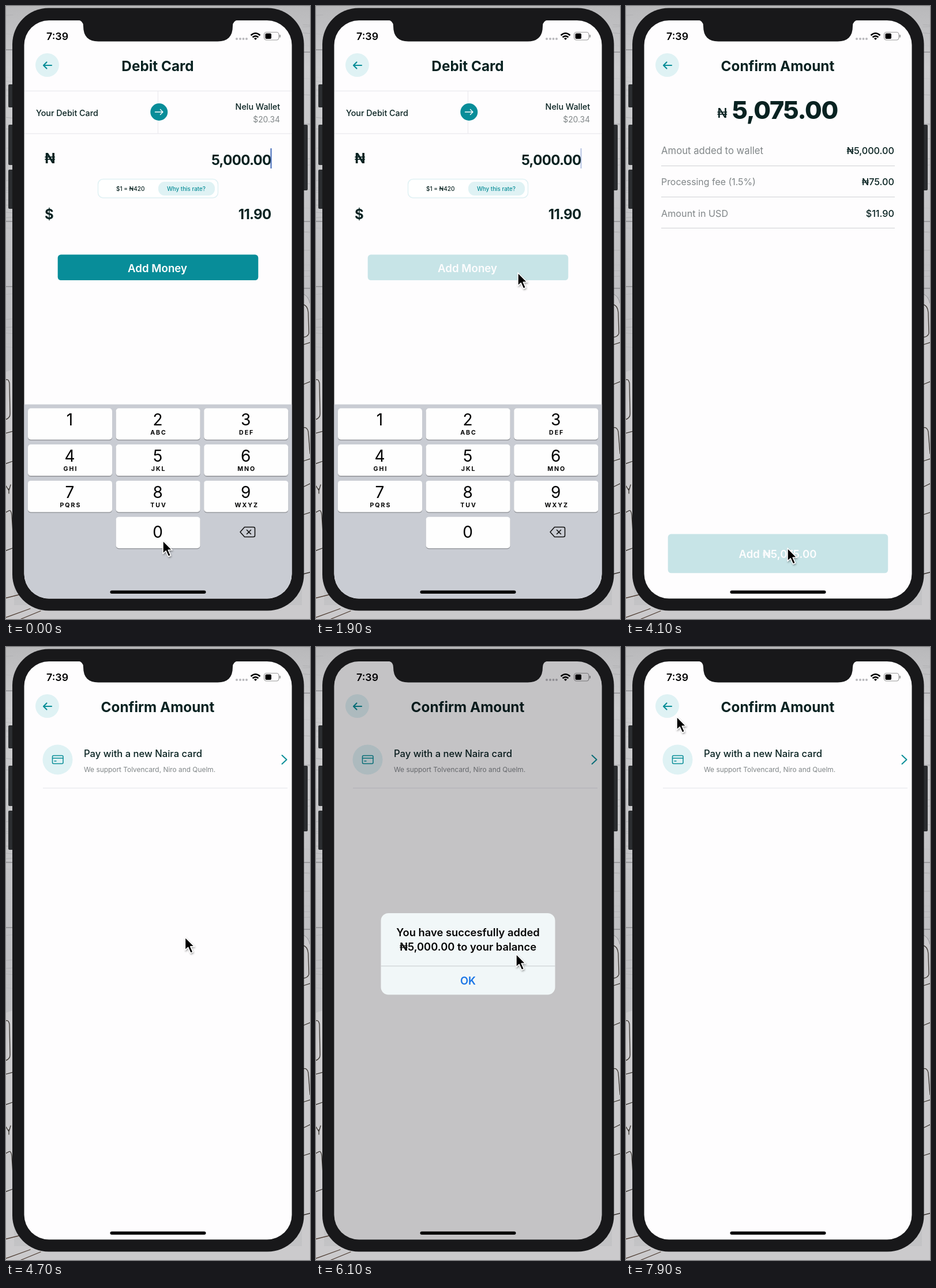
Recreate the animation shown at these times as an HTML page. Size 527 by 1064 pixels, loop 8000 ms.

```html
<!DOCTYPE html>
<html lang="en">
<head>
<meta charset="utf-8">
<title>Add money flow</title>
<style>
html, body { margin: 0; width: 100%; height: 100%; overflow: hidden; background: #c4c4c6; }
svg { display: block; width: 100vw; height: 100vh; }
text { font-family: Inter, "Open Sans", sans-serif; fill: #082221; white-space: pre; }
.mid { text-anchor: middle; }
.end { text-anchor: end; }
.s { font-weight: 600; }
.m { font-weight: 500; }
.title { font-size: 24.3px; font-weight: 700; text-anchor: middle; }
.sum { font-size: 24px; font-weight: 700; letter-spacing: -.7px; }
.total { font-size: 43px; font-weight: 800; letter-spacing: -1.3px; text-anchor: end; }
.row { font-size: 16.2px; }
.small { font-size: 14.3px; font-weight: 500; }
.grey { fill: #808688; }
.teal { fill: #0b8e98; }
.white { fill: #fff; }
.digit { font-size: 28px; fill: #000; text-anchor: middle; }
.abc { font-size: 10.6px; font-weight: 700; letter-spacing: 2px; fill: #000; text-anchor: middle; }
.line { fill: none; stroke-linecap: round; stroke-linejoin: round; }
</style>
</head>
<body>
<svg viewBox="0 0 527 1064" preserveAspectRatio="none">
  <defs>
    <clipPath id="screen"><rect x="31.500" y="25" width="464" height="1003.5" rx="43"/></clipPath>
    <linearGradient id="wood" x2="0" y2="1">
      <stop offset="0" stop-color="#b9b9bb"/><stop offset=".1" stop-color="#cbcbcd"/>
      <stop offset=".5" stop-color="#bfbfc2"/><stop offset="1" stop-color="#c3c3c5"/>
    </linearGradient>
    <filter id="soft" x="-50%" y="-50%" width="200%" height="200%">
      <feDropShadow dx="1" dy="2" stdDeviation="1.6" flood-opacity=".35"/>
    </filter>
    <g id="back">
      <circle cx="71.5" cy="102.5" r="20.5" fill="#dff2f4"/>
      <path class="line" d="M79 103H65.500M70.500 97.500L65 103l5.500 5.500" stroke="#0b8e98" stroke-width="2.200"/>
    </g>
    <rect id="sheet" x="31" y="25" width="465" height="1004" fill="#fefdfe"/>
  </defs>

  <rect width="527" height="1064" fill="url(#wood)"/>
  <g id="grain" class="line" stroke="#8f8f92"></g>
  <g>
    <path d="M0 635L14 630V1040H513V499Q524 502 527 518V1064H0z" fill="#cbcacc"/>
    <path class="line" d="M513 499Q524 502 527 516" stroke="#909094"/>
    <g class="line" stroke="#38332f" stroke-width="1.300">
      <path d="M-2 650Q4 645 6 655L7 708Q7 716 -2 718M-2 742L12 738M-2 795L12 790M0 833l5 8 3-10M5 838v8M-2 880L5 876Q9 874 10 884L13 930M-2 946L14 940"/>
      <path d="M515 518Q523 520 524 532L525 568Q524 574 515 575M515 588L527 584M515 657L527 652M515 732Q522 730 524 739L527 777M515 790L527 786M515 835L527 829M515 883L527 879M515 986L527 983"/>
      <path d="M-2 1028L26 1021M-2 1062L42 1046M26 1064L60 1050" stroke="#4e3d33"/>
    </g>
  </g>

  <g fill="#2b2d30">
    <rect x="4" y="136" width="10" height="40" rx="2"/><rect x="4" y="206" width="10" height="70" rx="2"/>
    <rect x="4" y="284" width="10" height="68" rx="2"/><rect x="513" y="206" width="10" height="114" rx="2"/>
  </g>
  <rect x="11" y="3.500" width="505.500" height="1046" rx="63" fill="#18181a"/>

  <g clip-path="url(#screen)">
    <g id="debit">
      <use href="#sheet"/><use href="#back"/>
      <text class="title" x="263" y="112.500">Debit Card</text>
      <path d="M32 147.500H495M32 221.500H495M263.500 148V221" stroke="#ececf0" stroke-width="1.300"/>
      <text class="small" x="52" y="190.500">Your Debit Card</text>
      <text class="small end" x="475" y="179.500">Nelu Wallet</text>
      <text class="grey end" x="475" y="201.500" font-size="13.800">$20.34</text>
      <circle cx="265.300" cy="184" r="15" fill="#088d99"/>
      <path class="line" d="M258.500 184H272M267.500 179.500L272 184l-4.500 4.500" stroke="#fff" stroke-width="1.400"/>
      <text class="sum" x="67" y="273">₦</text>
      <text class="sum end" x="459.500" y="275.500">5,000.00</text>
      <rect id="caret" x="458.500" y="247" width="2" height="35" fill="#4169b8"/>
      <rect x="159.500" y="300.500" width="208" height="32.500" rx="9" fill="#fff" stroke="#e0f1f4" stroke-width="1.500"/>
      <text class="m" x="191" y="320.700" font-size="10">$1 = ₦420</text>
      <rect x="264" y="305" width="98" height="24" rx="11" fill="#dff2f4"/>
      <text class="m mid teal" x="312.500" y="320.700" font-size="9.800">Why this rate?</text>
      <text class="sum" x="67" y="370">$</text>
      <text class="sum end" x="459.500" y="370">11.90</text>
      <g id="addBtn">
        <rect x="89.700" y="431.600" width="347.600" height="44.500" rx="5.500" fill="#088d99"/>
        <text class="s mid white" x="262.500" y="462" font-size="18.700">Add Money</text>
      </g>
      <rect x="31" y="691.500" width="465" height="338" fill="#c9ccd3"/>
      <g id="keys"></g>
      <path class="line" d="M413.500 904.500H429Q431.500 904.500 431.500 907V919Q431.500 921.500 429 921.500H413.500L406 913zM417.500 909.500l7 7M424.500 909.500l-7 7" stroke="#111" stroke-width="1.600"/>
    </g>

    <g id="confirm">
      <use href="#sheet"/><use href="#back"/>
      <text class="title" x="263" y="112.500">Confirm Amount</text>
      <text class="m" x="158" y="194" font-size="23">₦</text>
      <text class="total" x="367" y="195.500">5,075.00</text>
      <text class="row grey" x="61" y="257" style="font-size:16.700px">Amout added to wallet</text>
      <text class="row m end" x="465" y="257">₦5,000.00</text>
      <text class="row grey" x="61" y="311" style="font-size:15.900px">Processing fee (1.5%)</text>
      <text class="row m end" x="465" y="311">₦75.00</text>
      <text class="row grey" x="61" y="365.500">Amount in USD</text>
      <text class="row m end" x="465" y="365.500">$11.90</text>
      <path d="M61 277.500H466M61 331.500H466M61 385.500H466" stroke="#cfd0d4" stroke-width="1.200"/>
      <g id="payBtn">
        <rect x="72.700" y="916.600" width="381.500" height="67.700" rx="5.500" fill="#088d99"/>
        <text class="s mid white" x="263" y="958" font-size="18.600">Add ₦5,075.00</text>
      </g>
    </g>

    <g id="cards">
      <use href="#sheet"/><use href="#back"/>
      <text class="title" x="263" y="112.500">Confirm Amount</text>
      <g id="cardRow">
        <circle cx="89.500" cy="195.500" r="26" fill="#dff2f4"/>
        <g class="line" stroke="#0b8e98" stroke-width="1.500">
          <rect x="80.500" y="188.500" width="18.500" height="14" rx="2"/>
          <path d="M80.500 193H99M84 198h3"/>
          <path d="M478.500 188L486.500 195.500L478.500 203" stroke-width="2"/>
        </g>
        <text class="m" x="135" y="190.500" font-size="16.600">Pay with a new Naira card</text>
        <text class="grey" x="135" y="217" font-size="11.900">We support Tolvencard, Niro and Quelm.</text>
        <path d="M64 244.800H488" stroke="#e8e9ee" stroke-width="1.300"/>
      </g>
    </g>

    <g id="status">
      <text class="s" x="70" y="59" font-size="17.800" style="fill:#000">7:39</text>
      <path d="M400 57h.01M406 57h.01M411.500 57h.01M417 57h.01" stroke="#b9b9bc" stroke-width="4" stroke-linecap="round"/>
      <g class="line" stroke="#000" stroke-width="2.600" style="stroke-linecap:butt">
        <path d="M424.500 51Q432.500 43.500 440.500 51M427.500 54.300Q432.500 49.800 437.500 54.300"/>
        <path d="M429.800 56.300Q432.500 54.300 435.200 56.300L432.500 59z" fill="#000" stroke="none"/>
      </g>
      <rect x="447.500" y="45.500" width="25.500" height="13.500" rx="4" fill="none" stroke="#999" stroke-width="1.200"/>
      <path d="M475 50v4.500" stroke="#888" stroke-width="1.600"/>
      <rect x="449.500" y="47.500" width="10.500" height="9.500" rx="2" fill="#000"/>
    </g>
    <rect id="dim" x="31" y="25" width="465" height="1004" fill="#06000a"/>
    <g id="alert">
      <rect x="112.500" y="462" width="302" height="141.500" rx="13" fill="#f1f7f8"/>
      <path d="M112.500 553.800H414.500" stroke="#c4c8ca" stroke-width="1"/>
      <g class="s mid" font-size="18.350">
        <text x="263.500" y="502" style="fill:#050505">You have succesfully added</text>
        <text x="263.500" y="527" style="fill:#050505">₦5,000.00 to your balance</text>
        <text x="263.500" y="585.500" style="fill:#1874e6">OK</text>
      </g>
    </g>
    <rect x="180.500" y="1014.500" width="166" height="5.500" rx="2.750" fill="#000"/>
  </g>
  <path d="M124 24.500Q134 25 134 35Q134 61.500 160 61.500H367Q393 61.500 393 35Q393 25 403 24.500z" fill="#18181a"/>

  <path id="pointer" d="M0 0V22.500L5.200 17.700L9.500 27.500L13.500 25.800L9.200 16.200H16z" fill="#000" stroke="#fff" stroke-width="1.500" stroke-linejoin="round" filter="url(#soft)"/>
</svg>
<script>
const LOOP = 8000, STEP = 100;
const el = id => document.getElementById(id);
const clamp = v => Math.max(0, Math.min(1, v));
const ramp = (t, from, len) => clamp((t - from) / len);
const smooth = u => u * u * (3 - 2 * u);

// critically damped spring from 0 to 1; w is its rate per ms
const spring = (t, from, w) => {
  const x = Math.max(0, t - from) * w;
  return x > 8 ? 1 : 1 - (1 + x) * Math.exp(-x);
};

// a touchable fades while held down and recovers on release
const touch = (t, down, up) =>
  1 - 0.78 * smooth(ramp(t, down, 120)) * (1 - smooth(ramp(t, up, 300)));

const letters = ['', 'ABC', 'DEF', 'GHI', 'JKL', 'MNO', 'PQRS', 'TUV', 'WXYZ'];
const key = (x, y, digit, sub, digitY) => `
  <rect x="${x}" y="${y + 1.3}" width="146" height="54.500" rx="5" fill="#8b8d92"/>
  <rect x="${x}" y="${y}" width="146" height="54.500" rx="5" fill="#fefefe"/>
  <text class="digit" x="${x + 72.5}" y="${digitY}">${digit}</text>
  <text class="abc" x="${x + 74}" y="${y + 46}">${sub}</text>`;
el('keys').innerHTML = letters.map((sub, i) => {
  const y = 698.3 + 62.8 * Math.floor(i / 3);
  return key(38 + 152.6 * (i % 3), y, i + 1, sub, y + 29.7);
}).join('') + key(190.6, 886.7, 0, '', 923);

// faint plank seams and wood grain
let seed = 7;
const rnd = () => (seed = seed * 16807 % 2147483647) / 2147483647;
let grain = '<path d="M0 76H14M513 80H527M0 374H14M513 374H527M0 487H14M513 490H527" stroke="#77777a"/>';
for (let i = 0; i < 70; i++) {
  const y = rnd() * 620;
  grain += `<path d="M${i % 2 ? 0 : 515} ${y.toFixed(1)}l12 ${(rnd() * 3 - 1.5).toFixed(1)}" opacity="${(rnd() * .4).toFixed(2)}"/>`;
}
el('grain').innerHTML = grain;

// pointer stops: time, x, y
const stops = [
  [0, 272, 928], [250, 272, 928], [1450, 350, 463], [1950, 350, 463],
  [2550, 358, 321], [2800, 358, 321], [3750, 280, 941], [4150, 280, 941],
  [5150, 333, 180], [5400, 333, 180], [6100, 347, 533], [6250, 347, 533],
  [6850, 268, 578], [7200, 268, 578], [7900, 88, 121]
];
function pointerAt(t) {
  const i = stops.findIndex(s => s[0] > t);
  if (i < 0) return stops[stops.length - 1].slice(1);
  const [t0, x0, y0] = stops[i - 1], [t1, x1, y1] = stops[i];
  const u = smooth((t - t0) / (t1 - t0));
  return [x0 + (x1 - x0) * u, y0 + (y1 - y0) * u];
}

const fade = (id, v) => el(id).setAttribute('opacity', v.toFixed(3));
const place = (id, v) => el(id).setAttribute('transform', v);
const show = (id, on) => el(id).setAttribute('visibility', on ? 'visible' : 'hidden');

function draw(t) {
  const push1 = spring(t, 1980, 0.016), push2 = spring(t, 4130, 0.017);
  place('debit', `translate(${-140 * push1})`);
  place('confirm', `translate(${464 * (1 - push1) - 140 * push2})`);
  place('cards', `translate(${464 * (1 - push2)})`);
  show('debit', push1 < 1);
  show('confirm', push1 > 0 && push2 < 1);
  show('cards', push2 > 0);

  const phase = t % 1000;
  fade('caret', phase < 500 ? 1 : Math.max(1 - ramp(phase, 500, 150), ramp(phase, 850, 130)));
  fade('addBtn', touch(t, 1700, 1980));
  fade('payBtn', touch(t, 3900, 4130));
  fade('cardRow', touch(t, 5080, 5280));

  const open = spring(t, 5300, 0.0244), left = 1 - smooth(ramp(t, 7150, 300));
  fade('dim', 0.23 * open * left);
  fade('alert', Math.min(1, open * 1.08) * left);
  const k = 1.2 - 0.2 * open;
  place('alert', `translate(263.5 532.7) scale(${k}) translate(-263.5 -532.7)`);
  show('alert', open * left > 0);

  place('pointer', `translate(${pointerAt(t).join(' ')})`);
}

const start = performance.now();
function tick() {
  const t = (performance.now() - start) % LOOP;
  draw(Math.floor(t / STEP) * STEP);
  requestAnimationFrame(tick);
}
draw(0);
requestAnimationFrame(tick);
</script>
</body>
</html>
```
